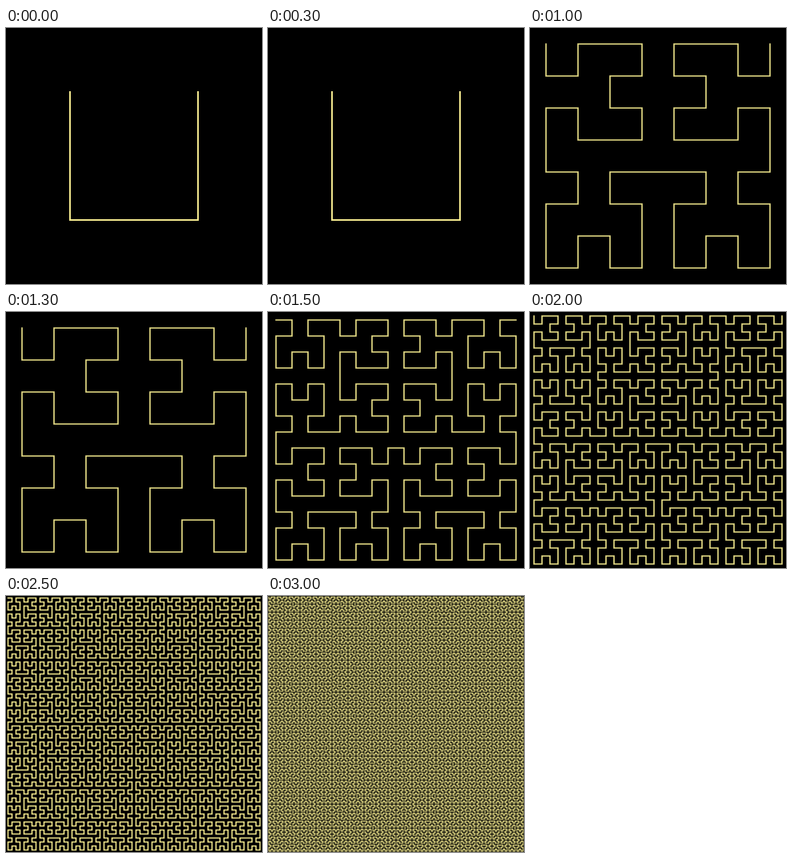
These frames come from a looping animation (320 px wide and 320 px high, 3500 ms). An HTML page with a canvas:

```html
<!DOCTYPE html>
<html lang="en">
<head>
<meta charset="utf-8">
<title>Hilbert curve</title>
<style>
  html, body { margin: 0; width: 100%; height: 100%; overflow: hidden; background: #000; }
  canvas { display: block; width: 320px; height: 320px; }
</style>
</head>
<body>
<canvas id="stage" width="320" height="320"></canvas>
<script>
const SIZE = 320;
const STEP = 500;
const WIDTHS = [2, 1.7, 1.6, 1.6, 1.6, 1.6, 1.25]; // one per curve order
const ctx = document.getElementById('stage').getContext('2d');

// Visits the square at (x, y) spanned by the vectors a and b.
function hilbert(x, y, ax, ay, bx, by, order, visit) {
  if (order === 0) {
    visit(x + (ax + bx) / 2, y + (ay + by) / 2);
    return;
  }
  const hax = ax / 2, hay = ay / 2, hbx = bx / 2, hby = by / 2;
  const n = order - 1;
  hilbert(x, y, hbx, hby, hax, hay, n, visit);
  hilbert(x + hax, y + hay, hax, hay, hbx, hby, n, visit);
  hilbert(x + hax + hbx, y + hay + hby, hax, hay, hbx, hby, n, visit);
  hilbert(x + hax + bx, y + hay + by, -hbx, -hby, -hax, -hay, n, visit);
}

const curves = WIDTHS.map((_, i) => {
  const path = new Path2D();
  hilbert(0, 0, 0, SIZE, SIZE, 0, i + 1, (x, y) => path.lineTo(x, y));
  return path;
});

function draw(i) {
  ctx.fillStyle = '#000';
  ctx.fillRect(0, 0, SIZE, SIZE);
  ctx.strokeStyle = '#f0e68c';
  ctx.lineWidth = WIDTHS[i];
  ctx.lineCap = 'square';
  ctx.lineJoin = 'miter';
  ctx.stroke(curves[i]);
}

const start = performance.now();
let shown = -1;

function tick() {
  const i = Math.floor((performance.now() - start) / STEP) % curves.length;
  if (i !== shown) draw(shown = i);
  requestAnimationFrame(tick);
}
tick();
</script>
</body>
</html>
```
